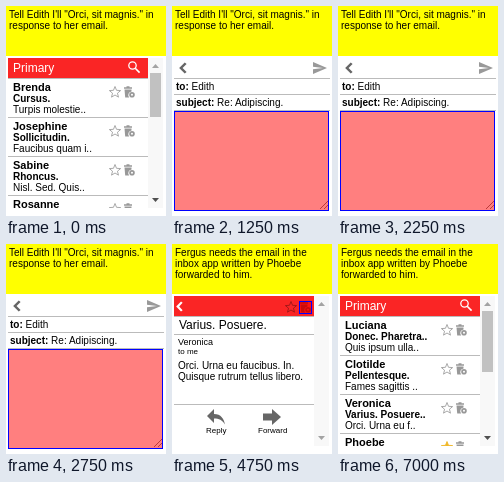
These frames come from a looping animation (160x210 px, 8000 ms). An HTML page:

```html
<!DOCTYPE html>
<html>
<head>
<meta charset="utf-8">
<style>
html, body { margin: 0; width: 160px; height: 210px; overflow: hidden; background: #fff; }
body { position: relative; font-family: "Liberation Sans", Arial, sans-serif; color: #000; }
div, svg { position: absolute; }
.text { white-space: pre; }
.scene { left: 0; top: 0; width: 160px; height: 210px; overflow: hidden; }
.clip { height: 202px; }
.icon { opacity: .4; }
.star { fill: none; }
.gold .last { opacity: 1; color: #f0b828; fill: #f0b828; }
#mark { box-sizing: border-box; border: 1px solid #00f; background: rgba(255, 0, 0, .5); }
</style>
</head>
<body>
<script>
const box = (x, y, w, h, color) =>
  `<div style="left:${x}px;top:${y}px;width:${w}px;height:${h}px;background:${color}"></div>`;
const line = (y, w = 140) => box(2, y, w, 1, '#bbb');

// Places text by its baseline.
const text = (x, base, size, str, style = '') => {
  const up = Math.round(size * .905), down = Math.round(size * .212);
  return `<div class="text" style="left:${x}px;top:${base - up}px;font-size:${size}px;line-height:${up + down}px;${style}">${str}</div>`;
};
const bold = 'font-weight:bold';

const svg = (x, y, w, h, view, body, cls = '') =>
  `<svg class="${cls}" style="left:${x}px;top:${y}px" width="${w}" height="${h}" viewBox="${view}" preserveAspectRatio="none">${body}</svg>`;

const starPoints = Array.from({length: 10}, (_, i) => {
  const r = i % 2 ? 2.6 : 5.9, a = i * Math.PI / 5;
  return (6 + r * Math.sin(a)).toFixed(2) + ',' + (6.4 - r * Math.cos(a)).toFixed(2);
}).join(' ');

const star = (x, y, cls = '') => svg(x, y, 12, 12, '0 0 12 12',
  `<polygon points="${starPoints}" stroke="currentColor" stroke-width=".85"/>`, 'icon star ' + cls);

const trash = (x, y) => svg(x, y, 12, 12, '0 0 12 12',
  `<path d="M1 1.3h2.5V.3h3v1H9v1.5H1zM1.5 3.5h7v2A3.6 3.6 0 0 0 6.2 11.5H2.2z"/>
   <circle cx="9" cy="8.8" r="1.9" fill="none" stroke="#000" stroke-width="1.8"/>`, 'icon');

const chevron = (x, y, w, h, color) => svg(x, y, w, h, '0 0 6 10',
  `<path d="M5 1L1.4 5 5 9" fill="none" stroke="${color}" stroke-width="1.9"/>`);

const arrow = (y, dir, on) => svg(146, y, 7, 4, '0 0 7 4',
  `<path d="${dir < 0 ? 'M0 4L3.5 0 7 4z' : 'M0 0L3.5 4 7 0z'}" fill="${on ? '#505050' : '#a3a3a3'}"/>`);

const scrollbar = thumb => box(142, 52, 15, 150, '#f8f8f8') + arrow(58, -1, false) +
  arrow(192, 1, thumb) + (thumb ? box(144, 67, 11, thumb, '#c1c1c1') : '');

const task = lines => box(0, 0, 160, 50, '#ff0') +
  lines.map((s, i) => text(3, 12 + 11 * i, 10, s)).join('');

const header = box(2, 52, 140, 20, '#fa2525') + line(72);

const list = (lines, thumb, rows) => task(lines) + header + text(7, 66, 12, 'Primary', 'color:#fff') +
  svg(121, 54, 14, 14, '0 0 14 14',
    '<g fill="none" stroke="#fff"><path d="M8.2 8.2L12.6 12.6" stroke-width="1.6"/><circle cx="5.5" cy="5.5" r="3.7" stroke-width="1.3"/></g>') +
  rows.map(([from, subject, body], i) => {
    const y = 39 * i;
    return text(7, 85 + y, 11, from, bold) + text(7, 96 + y, 10, subject, bold) +
      text(7, 107 + y, 10, body) + line(111 + y) +
      star(103, 80 + y, i === 3 ? 'last' : '') + trash(117, 80 + y);
  }).join('') + scrollbar(thumb);

const mail = (lines, subject, from, body) => task(lines) + header +
  chevron(4, 57, 7, 11, '#fff') + star(113, 57) + trash(127, 57) +
  text(7, 85, 12, subject) + line(90) +
  text(6, 101, 9, from) + text(6, 110, 8, 'to me') +
  body.map((s, i) => text(6, 125 + 11 * i, 10, s)).join('') + line(160) +
  svg(35, 165, 18, 16, '3 4 18 16', '<path fill="#666" d="M10 9V4l-7 7 7 7v-4.6c5 0 8.5 1.6 11 6.1-1-5.5-4-10.5-11-10.5z"/>') +
  svg(91, 165, 18, 16, '0 0 18 16', '<path fill="#666" d="M0 4.5h9V0l9 8-9 8v-4.5H0z"/>') +
  text(34, 189, 8, 'Reply') + text(86, 189, 8, 'Forward') + scrollbar(0);

const form = (lines, to, subject) => task(lines) + chevron(7, 56, 8, 12, '#666') +
  svg(141, 56, 14, 12, '2 3 21 18', '<path fill="#999" d="M2 21L23 12 2 3v7l15 2-15 2z"/>') +
  [72, 88, 104].map(y => line(y, 156)).join('') +
  text(4, 84, 10, `<b>to:</b> ${to}`) + text(4, 100, 10, `<b>subject:</b> ${subject}`) +
  svg(147, 194, 9, 9, '0 0 9 9', '<path d="M1 9L9 1M5 9L9 5" stroke="#777"/>');

const askReply = ['Tell Edith I\'ll "Orci, sit magnis." in', 'response to her email.'];
const askForward = ['Fergus needs the email in the', 'inbox app written by Phoebe', 'forwarded to him.'];

const scenes = {
  inboxA: list(askReply, 44, [
    ['Brenda', 'Cursus.', 'Turpis molestie..'],
    ['Josephine', 'Sollicitudin.', 'Faucibus quam i..'],
    ['Sabine', 'Rhoncus.', 'Nisl. Sed. Quis..'],
    ['Rosanne', '', '']]),
  mailA: mail(askReply, 'Adipiscing.', 'Edith', ['Nulla massa sed. In.', 'Viverra porta tempus leo.']),
  reply: form(askReply, 'Edith', 'Re: Adipiscing.'),
  inboxB: list(askForward, 61, [
    ['Luciana', 'Donec. Pharetra..', 'Quis ipsum ulla..'],
    ['Clotilde', 'Pellentesque.', 'Fames sagittis ..'],
    ['Veronica', 'Varius. Posuere..', 'Orci. Urna eu f..'],
    ['Phoebe', '', '']]),
  mailB: mail(askForward, 'Varius. Posuere.', 'Veronica', ['Orci. Urna eu faucibus. In.', 'Quisque rutrum tellus libero.'])
};

document.body.innerHTML = Object.entries(scenes).map(([id, html]) =>
  `<div class="scene ${id === 'reply' ? '' : 'clip'}" id="${id}">${html}</div>`).join('') + '<div id="mark"></div>';

// Start of each scene, and each marked click: start, x, y, width, height.
const cuts = [[0, 'inboxA'], [500, 'mailA'], [1000, 'reply'], [4000, 'inboxB'], [4500, 'mailB'], [6500, 'inboxB']];
const clicks = [
  [750, 34, 164, 19, 19],
  ...[1250, 1750, 2250, 2750].map(t => [t, 2, 105, 155, 100]),
  [4250, 7, 176, 88, 12],
  [4750, 127, 57, 13, 13],
  [5250, 2, 56, 141, 105],
  [5750, 113, 57, 13, 13],
  [6250, 2, 56, 13, 13],
  [6750, 103, 197, 13, 13]
];
const byId = id => document.getElementById(id);
const mark = byId('mark');
const start = performance.now();

function draw(now) {
  const t = Math.max(0, now - start) % 8000;
  const current = cuts.filter(c => c[0] <= t).pop()[1];
  for (const id in scenes) byId(id).style.display = id === current ? '' : 'none';
  byId('inboxB').classList.toggle('gold', t >= 7000);

  const click = clicks.find(c => t >= c[0] && t < c[0] + 250);
  mark.style.display = click ? '' : 'none';
  if (click) ['left', 'top', 'width', 'height'].forEach((k, i) => mark.style[k] = click[i + 1] + 'px');
  requestAnimationFrame(draw);
}
draw(start);
</script>
</body>
</html>
```
